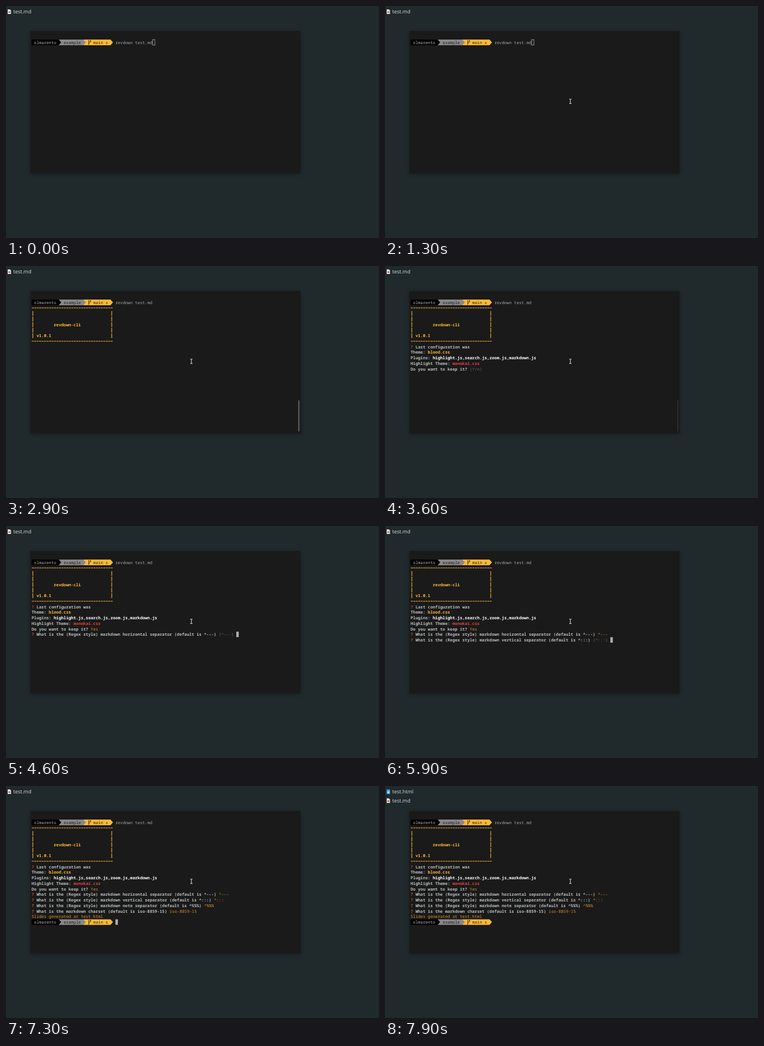
These frames come from a looping animation (656x408 px, 8 s). An HTML page:

```html
<!DOCTYPE html>
<html lang="en">
<head>
<meta charset="utf-8">
<title>Terminal session</title>
<style>
html, body { margin: 0; width: 100%; height: 100%; overflow: hidden; background: #20292c; }
svg { display: block; width: 656px; height: 408px; }
text { text-rendering: geometricPrecision; white-space: pre; font-variant-ligatures: none; }
.mono { font: 7.228px "Noto Sans Mono", "DejaVu Sans Mono", monospace; }
.bold { font-weight: 700; }
.label { font: 8.9px "Noto Sans", "Open Sans", sans-serif; fill: #cfd3d4; }
</style>
</head>
<body>
<svg id="stage" viewBox="0 0 656 408" xmlns="http://www.w3.org/2000/svg">
  <defs>
    <filter id="blur" x="-10%" y="-10%" width="120%" height="120%"><feGaussianBlur stdDeviation="3"/></filter>
  </defs>
  <rect width="656" height="408" fill="#20292c"/>
  <rect x="43" y="46" width="475" height="249.5" fill="#000" opacity=".35" filter="url(#blur)"/>
  <rect x="43" y="44" width="475" height="250" fill="#1a1a1a"/>
</svg>
<script>
const LOOP = 8000, STEP = 100;
const LEFT = 45, TOP = 59, CW = 4.337, LH = 9.745;
const GREY = '#a6a6a6', LIGHT = '#b9bcbe', DIM = '#686868', GOLD = '#ffb937',
      AMBER = '#d69433', RED = '#e2423f', MARK = '#bd5a2c', WHITE = '#ffffff';

const stage = document.getElementById('stage');
const timed = [];
const colX = c => LEFT + c * CW;
const rowY = r => TOP + r * LH;

function add(tag, attrs, parent = stage, content) {
  const el = document.createElementNS('http://www.w3.org/2000/svg', tag);
  for (const k in attrs) el.setAttribute(k, attrs[k]);
  if (content !== undefined) el.textContent = content;
  parent.appendChild(el);
  return el;
}

// Group visible only during [from, to)
function during(from, to = LOOP) {
  const el = add('g', {});
  timed.push({ el, from, to });
  return el;
}

function put(parent, row, col, str, fill, bold) {
  add('text', { x: colX(col), y: rowY(row) + 7.6, fill, class: bold ? 'mono bold' : 'mono' }, parent, str);
}

// Each part is [text, colour, bold]; parts follow one another on the row
function line(parent, row, ...parts) {
  let col = 0;
  for (const [str, fill, bold] of parts) {
    put(parent, row, col, str, fill, bold);
    col += str.length;
  }
}

function segment(parent, row, from, to, fill) {
  const y = rowY(row), b = y + 9.9, x = colX(to);
  add('path', { d: `M${colX(from)} ${y}H${x}L${x + CW} ${(y + b) / 2}L${x} ${b}H${colX(from)}Z`, fill }, parent);
}

function prompt(parent, row) {
  segment(parent, row, 21, 32, GOLD);
  segment(parent, row, 11, 21, '#8b8889');
  segment(parent, row, 0, 11, '#000');
  put(parent, row, 1, 'olmarento', '#b4b4b4');
  put(parent, row, 13, 'example', '#222');
  put(parent, row, 25, 'main', '#2a220f');
  put(parent, row, 30, '±', '#2a220f');
  const x = colX(23) + .8, y = rowY(row);
  add('path', {
    d: `M${x} ${y + 1}v8.4M${x} ${y + 7}q3 -1.4 3 -4.6M${x + 1.7} ${y + 3.2}l1.3 -1.9l1.1 1.9`,
    fill: 'none', stroke: '#2a220f', 'stroke-width': .9
  }, parent);
}

function cursor(from, to, row, col) {
  add('rect', { x: colX(col), y: rowY(row) + .1, width: CW, height: 9.6, fill: '#aab0b3' }, during(from, to));
}

// Desktop files
function mdFile(parent, y) {
  add('path', { d: `M3 ${y - 4.3}h3.8l2 2v6h-5.8z`, fill: '#eceeee' }, parent);
  add('path', { d: `M6.8 ${y - 4.3}v2h2z`, fill: '#b9bdbe' }, parent);
  add('rect', { x: 4.2, y: y - .8, width: 3.4, height: 2.6, fill: '#c4524c' }, parent);
  add('text', { x: 12.8, y: y + 3, class: 'label' }, parent, 'test.md');
}
function htmlFile(parent, y) {
  add('path', { d: `M2.8 ${y - 4.3}h4.2l2 2v6.2h-6.2z`, fill: '#2f9be6' }, parent);
  add('path', { d: `M7 ${y - 4.3}v2h2z`, fill: '#a5d5f6' }, parent);
  add('circle', { cx: 5.9, cy: y + .7, r: 1.8, fill: '#d4ecfb' }, parent);
  add('text', { x: 12.8, y: y + 3, class: 'label' }, parent, 'test.html');
}
mdFile(during(0, 7400), 10.3);
const files = during(7400);
htmlFile(files, 10.3);
mdFile(files, 26.1);

// Command
const base = during(0);
prompt(base, 0);
put(base, 0, 34, 'revdown test.md', GREY);
add('rect', {
  x: colX(49) + .3, y: TOP + .1, width: CW - .2, height: 9.6,
  fill: 'none', stroke: '#b2b2b2', 'stroke-width': .8
}, during(0, 1500));

// Banner: a frame of one stroke per character cell
const banner = during(2900);
function rule(d, on, cell) {
  add('path', { d, fill: 'none', stroke: GOLD, 'stroke-width': 1.1, 'stroke-dasharray': `${on} ${cell - on}` }, banner);
}
for (const r of [1, 7]) rule(`M${colX(0) + .4} ${rowY(r) + 5}H${colX(33)}`, 3.5, CW);
for (const c of [0, 32]) rule(`M${colX(c + .5)} ${rowY(2) + .7}V${rowY(7)}`, 8.6, LH);
put(banner, 4, 9, 'revdown-cli', GOLD, true);
put(banner, 6, 2, 'v1.0.1', GOLD, true);

// Saved settings
const saved = during(3000);
line(saved, 8, ['? ', '#b8432f', true], ['Last configuration was', LIGHT, true]);
line(saved, 9, ['Theme: ', LIGHT, true], ['blood.css', GOLD, true]);
line(saved, 10, ['Plugins: ', LIGHT, true], ['highlight.js,search.js,zoom.js,markdown.js', WHITE, true]);
line(saved, 11, ['Highlight Theme: ', LIGHT, true], ['monokai.css', RED, true]);

// Question with a dim hint that turns into the answer
function ask(row, mark, question, hint, answer, from, done) {
  line(during(from), row, [mark, MARK, true], [question, LIGHT, true]);
  const col = mark.length + question.length;
  put(during(from, done), row, col, `(${hint})`, DIM);
  put(during(done), row, col, answer, AMBER);
  return col + hint.length + 3;
}
const regex = (kind, value) => `What is the (Regex style) markdown ${kind} separator (default is ${value}) `;

let end = ask(12, '', 'Do you want to keep it? ', 'Y/n', 'Yes', 3000, 4600);
cursor(3000, 3200, 12, end);
cursor(3800, 4400, 12, end);
end = ask(13, '? ', regex('horizontal', '^---'), '^---', '^---', 4600, 5400);
cursor(4600, 5200, 13, end);
end = ask(14, '? ', regex('vertical', '^:::'), '^:::', '^:::', 5400, 6000);
cursor(5400, 6000, 14, end);
end = ask(15, '? ', regex('note', '^%%%'), '^%%%', '^%%%', 6000, 6600);
cursor(6000, 6600, 15, end);
end = ask(16, '? ', 'What is the markdown charset (default is iso-8859-15) ', 'iso-8859-15', 'iso-8859-15', 6600, 7200);
cursor(6600, 7200, 16, end);

put(during(7300), 17, 0, 'Slides generated at test.html', AMBER);
prompt(during(7300), 18);
cursor(7300, 7900, 18, 34);
cursor(1500, 2100, 0, 49);
cursor(2600, 2900, 1, 0);

// Scrollbar and pointer
const bar = add('rect', { x: 514, y: 236, width: 2.1, height: 55, rx: 1, fill: '#626262' });
const pointer = add('g', {});
const beam = add('path', {
  d: 'M-2 -3.8H-.6L0 -3.3L.6 -3.8H2M0 -3.3V3.5M-2 4H-.6L0 3.5L.6 4H2',
  fill: 'none', stroke: '#f0f0f0', 'stroke-width': 1
}, pointer);
const arrow = add('path', {
  d: 'M0 0V9L2.2 7L3.7 10L5 9.4L3.6 6.5H6.4Z', fill: '#111', stroke: '#f0f0f0', 'stroke-width': .7
}, pointer);

const clamp = v => Math.max(0, Math.min(1, v));
const show = (el, on) => el.setAttribute('display', on ? 'inline' : 'none');

function draw(now) {
  const t = Math.floor((now % LOOP) / STEP) * STEP;
  for (const { el, from, to } of timed) show(el, t >= from && t < to);

  const fadeIn = t < 1500 ? 0 : t < 1700 ? .8 : 1;
  bar.setAttribute('opacity', Math.min(fadeIn, clamp((3800 - t) / 700)));

  const p = clamp((t - 1100) / 200), k = 1 - (1 - p) ** 2;
  const x = 639 + (326 - 639) * k, y = 131.5 + (167.6 - 131.5) * k;
  pointer.setAttribute('transform', `translate(${x} ${y})`);
  show(pointer, t >= 1100);
  show(beam, x < 518);
  show(arrow, x >= 518);
}

let start;
function tick(now) {
  if (start === undefined) start = now;
  draw(now - start);
  requestAnimationFrame(tick);
}
draw(0);
requestAnimationFrame(tick);
</script>
</body>
</html>
```
